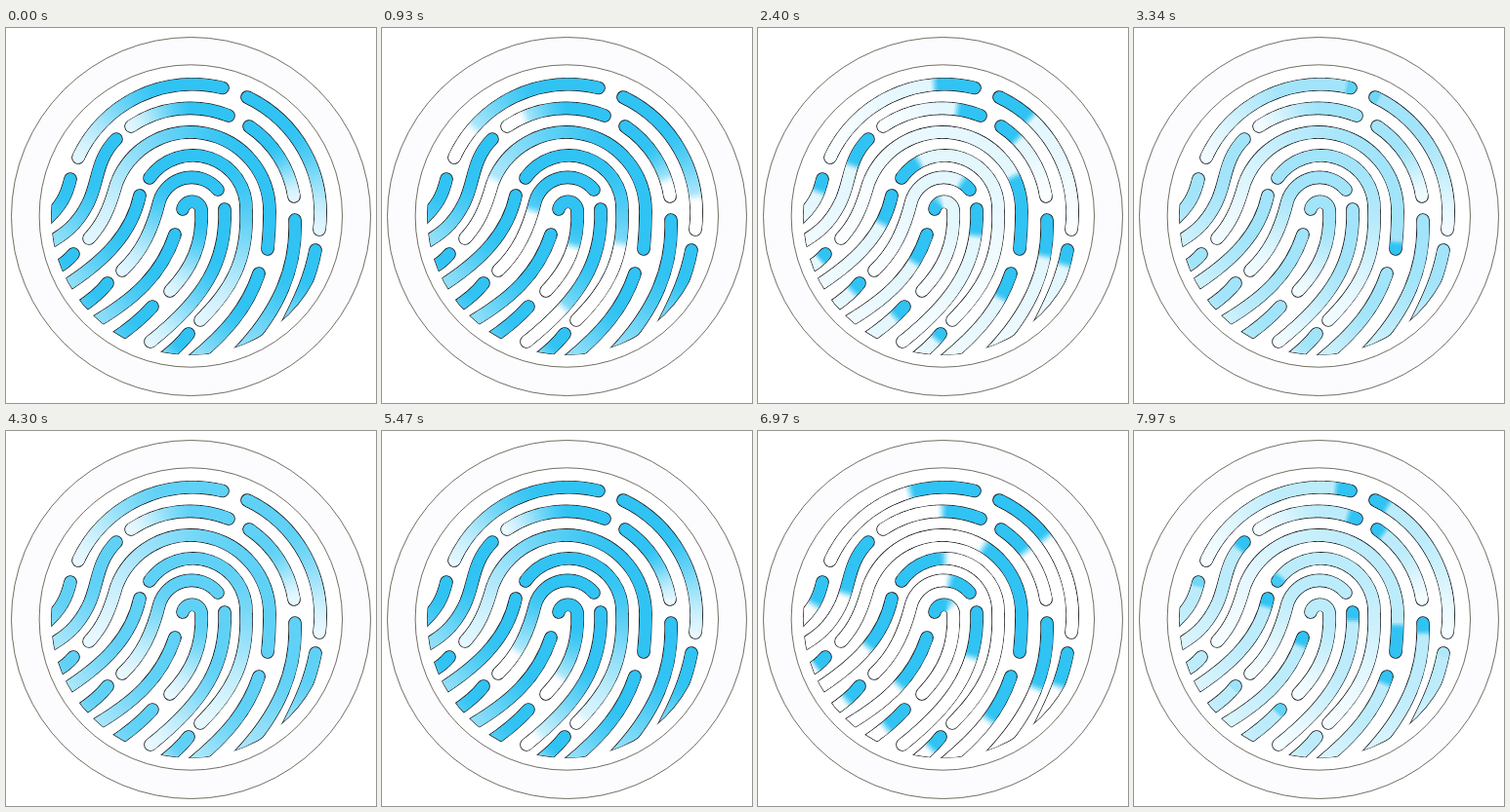
Write an HTML page with a canvas that moves like this. It is 379 px wide and 385 px high and loops after 8000 ms.

```html
<!DOCTYPE html>
<html lang="en">
<head>
<meta charset="utf-8">
<title>Fingerprint scan</title>
<style>
  html, body { margin: 0; width: 100%; height: 100%; overflow: hidden; background: #fff; }
  canvas { display: block; }
  svg { position: absolute; width: 0; height: 0; }
</style>
</head>
<body>
<canvas id="stage" width="379" height="385"></canvas>
<svg><path id="probe"/></svg>
<script>
const ctx = document.getElementById('stage').getContext('2d');
const probe = document.getElementById('probe');

const LOOP = 8000, CYCLE = 5000, WIPE = 3600, FADE_START = 2000;
const BLUE = [48, 195, 243], PALE = [228, 247, 254];
const INK = '#1a1d20';

// gain and power shape the retreat of the blue; tail is how pale the far end gets
const groups = [
  { gain: 1.25, power: 1.55, tail: 1, paths: [
    'M222 61.5A129 129 0 0 0 74 133',
    'M247 71A132 132 0 0 1 321 207',
    'M228 90A107 107 0 0 0 128 101',
    'M249 101A107 107 0 0 1 295 173',
    'M268 227Q270 208 270 188A81 81 0 0 0 113 160C106 185 99 201 85 216'] },
  { gain: 1.37, power: 2.5, tail: 1, paths: [
    'M147 154A54.5 54.5 0 0 1 246 188C248 240 229 270 199 300'] },
  { gain: 1.15, power: 2.6, tail: 1, paths: [
    'M217 166A34.7 34.7 0 0 0 157 178C150 206 140 229 119 249',
    'M181 186A9.7 9.7 0 0 1 200 186C202 222 190 247 168 270'] },
  { gain: 1.15, power: 1.8, tail: 1, paths: [
    'M224 186C226 240 203 278 148 322'] },
  { gain: 2.05, power: 2, tail: 0.6, paths: [
    'M113 114C92 135 95 158 84 180S60 212 40 223',
    'M137 172C129 209 104 238 56 268',
    'M173 212C160 251 134 278 84 306',
    'M259 252C247 288 225 313 190 342',
    'M296 197C298 245 281 290 234 338'] },
  { gain: 3.4, power: 2.8, tail: 0.6, paths: [
    'M317 228C312 254 303 276 284 312',
    'M187 314Q177 327 160 340'] },
  { gain: 2.2, power: 2, tail: 0.25, paths: [
    'M66 155C62 172 57 182 40 198',
    'M69 232Q62 241 48 248',
    'M104 262Q94 275 74 288',
    'M150 286Q135 303 108 321'] }
];

const clamp = v => Math.max(0, Math.min(1, v));
const smooth = v => { v = clamp(v); return v * v * (3 - 2 * v); };
const mix = (a, b, k) => a.map((v, i) => v + (b[i] - v) * k);
const rgb = c => `rgb(${c.map(Math.round).join(',')})`;

function sample(d, group) {
  probe.setAttribute('d', d);
  const length = probe.getTotalLength();
  const count = Math.ceil(length / 2);
  const points = Array.from({ length: count + 1 }, (_, i) =>
    probe.getPointAtLength(length * i / count));
  return { ...group, length, count, points, shape: new Path2D(d) };
}

const ridges = groups.flatMap(g => g.paths.map(d => sample(d, g)));

function disc(x, y, r, fill) {
  ctx.beginPath();
  ctx.arc(x, y, r, 0, Math.PI * 2);
  ctx.fillStyle = fill;
  ctx.fill();
  ctx.strokeStyle = '#4c4c3c';
  ctx.lineWidth = 0.8;
  ctx.stroke();
}

function clipped(radius, paint) {
  ctx.save();
  ctx.beginPath();
  ctx.arc(189, 193, radius, 0, Math.PI * 2);
  ctx.clip();
  paint();
  ctx.restore();
}

function drawRidge(ridge, phase) {
  const { points, count, length, gain, power, tail } = ridge;
  const front = gain * length * Math.pow(clamp(1 - phase / WIPE), power);
  const fade = clamp((phase - FADE_START) / (CYCLE - FADE_START));
  const soft = Math.min(12, length * 0.3);

  function segment(i, cap) {
    const s = (i + 0.5) / count;
    const wipe = smooth((front - s * length) / soft + 0.5) * clamp(front / 4);
    const hue = mix(BLUE, PALE, tail * smooth((s - 0.3) / 0.75));
    ctx.strokeStyle = rgb(mix([255, 255, 255], hue, Math.max(wipe, fade)));
    ctx.lineCap = cap;
    ctx.beginPath();
    ctx.moveTo(points[i].x, points[i].y);
    // reach one step further to hide the seam
    for (let j = i + 1; j <= Math.min(i + 2, count); j++) ctx.lineTo(points[j].x, points[j].y);
    ctx.stroke();
  }

  ctx.lineWidth = 11.9;
  segment(0, 'round');
  segment(count - 1, 'round');
  for (let i = count - 1; i >= 0; i--) segment(i, 'butt');
}

function draw(now) {
  const phase = now % LOOP % CYCLE;
  ctx.fillStyle = '#fff';
  ctx.fillRect(0, 0, 379, 385);
  disc(189.5, 193.5, 184, '#fcfbfe');
  disc(189.3, 193, 155.2, '#fff');

  clipped(143, () => {
    ctx.lineCap = 'round';
    ctx.lineWidth = 13.6;
    ctx.strokeStyle = INK;
    ridges.forEach(r => ctx.stroke(r.shape));
  });
  clipped(142.2, () => ridges.forEach(r => drawRidge(r, phase)));
}

const begin = performance.now();
function tick() {
  draw(performance.now() - begin);
  requestAnimationFrame(tick);
}
tick();
</script>
</body>
</html>
```
